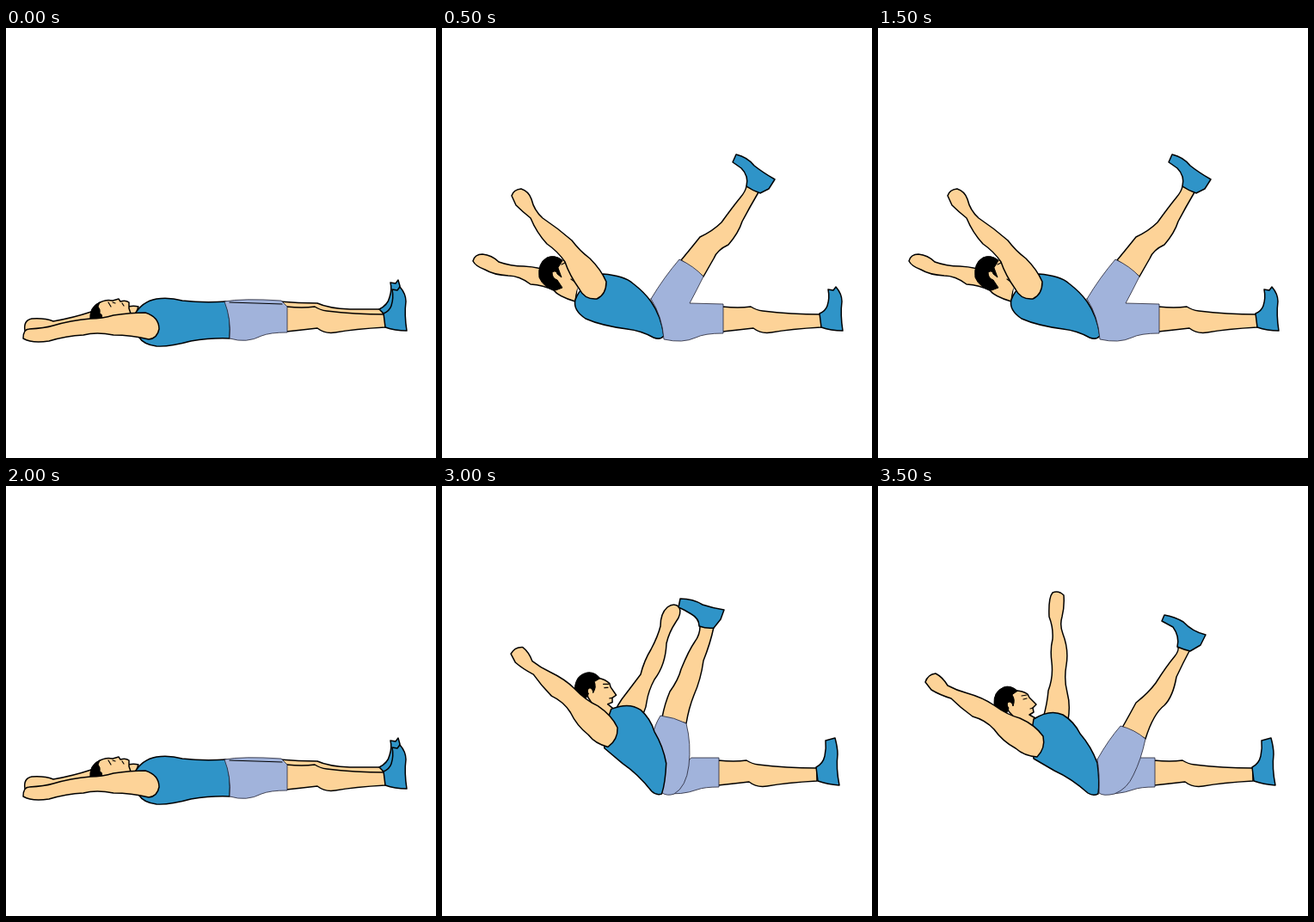
These frames come from a looping animation (500 px wide and 500 px high, 4 s). An HTML page without scripts:

```html
<!DOCTYPE html>
<html lang="en">
<head>
<meta charset="utf-8">
<title>Alternating toe touch</title>
<style>
  html, body { margin: 0; width: 100%; height: 100%; overflow: hidden; background: #fff; }
  svg { display: block; width: 100%; height: 100%; }
  path { stroke: #000; stroke-width: 1.5; stroke-linejoin: round; stroke-linecap: round; }
  .skin { fill: #fdd398; }
  .blue { fill: #2f94c8; }
  .shorts { fill: #a1b3db; stroke-width: .8; stroke: #223; }
  .hair { fill: #000; stroke-width: 1; }
  .line { fill: none; stroke-width: 1.2; }
  .bare { stroke: none; }

  .pose { visibility: hidden; animation: 4s step-end infinite; }
  .lying { animation-name: lying; }
  .openNear { animation-name: open-near; }
  .touchNear { animation-name: touch-near; }
  .openFar { animation-name: open-far; }
  .touchFar { animation-name: touch-far; }
  @keyframes lying { 0%, 50% { visibility: visible } 12.5%, 62.5%, 100% { visibility: hidden } }
  @keyframes open-near { 0%, 25%, 50%, 100% { visibility: hidden } 12.5%, 37.5% { visibility: visible } }
  @keyframes touch-near { 0%, 37.5%, 100% { visibility: hidden } 25% { visibility: visible } }
  @keyframes open-far { 0%, 75% { visibility: hidden } 62.5%, 87.5%, 100% { visibility: visible } }
  @keyframes touch-far { 0%, 87.5%, 100% { visibility: hidden } 75% { visibility: visible } }
</style>
</head>
<body>
<svg viewBox="0 0 500 500">
  <defs>
    <path id="shin" class="skin" d="M326 324Q345 326 359 324Q365 328 373 329Q405 333 441 333V348Q405 350 383 354Q371 356 362 349Q345 351 326 353Z"/>
    <g id="restLeg">
      <use href="#shin"/>
      <path class="blue" d="M439 332Q446 329 448 323Q451 314 449 304L455 305L458 301Q465 309 465 318Q463 333 466 352Q452 352 441 348Z"/>
    </g>
    <g id="restLegFar">
      <use href="#shin" x="-5" y="-5"/>
      <path class="blue" d="M435 327Q443 323 445 314Q447 305 446 296L457 293Q460 304 460 312Q458 328 462 348Q448 347 437 343Z"/>
      <path class="shorts" d="M290 316H322V350Q305 350 297 353Q278 360 258 357Z"/>
    </g>
    <g id="highLeg">
      <path class="skin" d="M259 266Q262 250 268 236Q278 222 281 210Q290 188 297 178Q303 170 303 160L319 161Q315 180 307 200Q304 222 296 240Q290 255 287 273Z"/>
      <path class="blue" d="M278 138L280 128Q295 128 306 135Q318 139 331 141L327 152L319 162Q311 163 302 160Q302 151 293 146Q285 141 278 138Z"/>
    </g>
    <path id="reachArm" class="skin" d="M201 270Q203 258 212 245Q225 228 234 216Q238 200 246 187Q254 172 257 160Q257 145 265 138Q273 132 279 138Q282 146 275 155Q267 167 264 180Q263 205 250 222Q243 235 241 248Q240 260 230 272Q215 284 204 278Q200 275 201 270Z"/>
    <g id="farTorso">
      <path class="skin" d="M152 262Q145 245 160 238Q168 238 174 242L176 246L184 254L180 258L181 263L176 266L185 271L188 286L165 276Z"/>
      <path class="hair" d="M162 238Q154 231 146 234Q134 239 135 254Q140 262 149 266L152 258Q148 254 152 251Q156 251 157 256Q160 248 156 243Z"/>
      <path class="line" d="M167 244L173 243M169 248L173 247M177 259L180 258"/>
      <path class="blue" d="M181 271Q200 259 215 266Q228 274 235 288Q248 303 255 322Q258 345 256 358Q250 361 244 357Q225 340 205 331L181 317L178 290Z"/>
      <path class="skin" d="M55 228Q58 219 67 218Q75 222 81 232Q92 238 104 241Q122 246 135 255Q150 266 165 270Q183 278 192 291Q195 305 185 315Q170 314 160 305Q145 297 135 283Q125 272 110 268Q96 258 85 247Q72 243 62 237Z"/>
    </g>
  </defs>

  <g class="pose lying">
    <path class="skin" d="M318 318Q340 320 362 320Q375 326 400 327L436 327L440 335L320 332Z"/>
    <path class="blue" d="M434 327Q444 322 446 313Q449 304 447 296L453 297L456 293L458 300L450 334L440 333Z"/>
    <use href="#restLeg"/>
    <path class="skin" d="M22 352Q20 340 30 338Q45 337 55 341Q78 337 99 330L112 342L50 355Z"/>
    <path class="skin" d="M138 325Q147 322 154 324L150 335H136Z"/>
    <path class="skin" d="M106 321Q115 315 124 317L131 315L133 318Q139 316 143 319L143 326L145 332L125 340H103Z"/>
    <path class="hair" d="M98 341Q96 324 109 319L107 324Q110 327 109 332Q113 333 111 338Z"/>
    <path class="line" d="M119 319L122 324M124 319L127 320M135 320L137 323"/>
    <path class="blue" d="M149 334Q158 318 175 315Q190 313 205 317Q230 320 256 318Q262 340 260 361Q240 360 215 364Q190 371 175 370Q160 368 155 360Z"/>
    <path class="skin" d="M20 361Q20 350 27 350Q45 349 55 346Q75 340 98 338Q112 338 125 334Q145 331 162 331Q178 336 178 350Q176 361 166 362Q145 357 125 357Q105 353 90 357Q70 358 50 364Q30 367 20 361Z"/>
    <path class="shorts" d="M254 318Q275 314 320 317L327 324V354Q307 354 297 358Q280 367 260 361Q262 338 254 318Z"/>
    <path class="line" d="M260 319L321 321"/>
  </g>

  <g class="pose openNear">
    <use href="#restLeg"/>
    <path class="skin" d="M36 271Q38 263 47 263Q58 264 66 272Q80 277 95 277Q115 278 130 285L157 303L155 318Q135 312 130 305Q118 299 103 298Q90 288 77 288Q60 287 50 281Q39 277 36 271Z"/>
    <path class="skin bare" d="M124 280L142 269L160 294L155 310L136 300Z"/>
    <path class="hair" d="M140 270Q131 263 122 267Q111 273 113 290Q118 302 132 305L140 302L134 293Q128 291 128 284Q133 281 134 286L139 290L135 279Z"/>
    <path class="line" d="M139 275L145 272M150 292L157 297"/>
    <path class="blue" d="M187 286Q212 288 222 297Q235 307 243 318Q255 335 258 358Q254 363 246 360Q232 352 215 350Q185 346 167 338Q152 328 155 316Q158 308 163 303Z"/>
    <path class="skin" d="M81 195Q83 188 92 187Q101 190 104 199Q107 212 117 221Q135 233 151 247Q160 259 172 268Q185 281 191 295Q191 310 180 315Q166 316 160 304Q148 287 143 272Q135 260 122 251Q110 238 103 221Q93 213 86 206Z"/>
    <path class="skin" d="M278 270Q288 258 300 243Q315 236 325 226Q338 208 347 197Q353 190 354 184L368 191Q358 208 349 225Q345 238 333 252Q320 258 316 268L304 289Z"/>
    <path class="blue" d="M338 156L342 147Q355 150 363 160Q373 168 387 176L380 187L370 192Q361 189 354 184Q357 172 348 163Z"/>
    <path class="shorts" d="M243 315Q258 290 276 269Q293 277 304 289Q296 305 288 320L327 321V355Q305 355 295 360Q280 367 258 362Q256 335 243 315Z"/>
  </g>

  <g class="pose touchNear">
    <use href="#restLeg"/>
    <use href="#highLeg"/>
    <path class="skin" d="M85 190Q86 183 96 183Q104 186 105 196Q110 206 118 209Q135 217 147 226L162 240L190 262L176 289Q168 270 155 255Q140 248 128 235Q117 218 100 210Q87 198 85 190Z"/>
    <path class="skin" d="M166 240Q174 222 184 223Q191 225 196 229L197 235L202 243L198 247L196 253L187 256L199 259L181 270Z"/>
    <path class="hair" d="M184 223Q175 215 165 218Q151 225 152 240Q155 252 165 257L173 258L171 250Q164 246 166 241Q171 238 172 244L176 248L174 236Q180 232 178 226Z"/>
    <path class="line" d="M187 231L194 229M188 235L193 234M193 248L198 247"/>
    <path class="shorts" d="M247 290Q250 275 257 264Q273 266 287 273Q288 290 283 308L281 320L327 321V355Q305 355 295 360Q280 367 257 362L250 340Z"/>
    <path class="blue" d="M177 288Q177 270 190 261Q198 255 206 257L233 267Q246 282 250 300Q255 320 255 357Q250 360 243 356Q230 343 212 330Q190 315 184 305Q176 295 177 288Z"/>
    <use href="#reachArm"/>
  </g>

  <g class="pose openFar">
    <path class="skin" d="M192 270Q197 252 198 238Q204 222 202 205Q200 190 203 178Q204 165 199 152Q198 130 203 124Q210 121 216 127Q217 140 214 152Q211 162 215 172Q222 190 219 208Q216 225 220 240Q224 255 221 272Z"/>
    <use href="#restLegFar"/>
    <use href="#farTorso"/>
    <path class="skin" d="M284 281Q293 265 300 252Q315 240 323 229Q335 210 345 198Q350 192 349 187L363 190Q355 205 347 222Q343 245 333 255Q320 265 311 294Z"/>
    <path class="blue" d="M330 157L333 150Q345 152 355 158Q365 169 381 173L375 185L363 192Q355 190 348 187Q351 175 343 164Z"/>
    <path class="shorts" d="M255 318Q268 295 282 279Q298 283 311 294Q306 318 297 336Q290 352 275 358Q262 361 257 357Q258 335 255 318Z"/>
  </g>

  <g class="pose touchFar">
    <use href="#reachArm" x="-3" y="3"/>
    <use href="#restLegFar"/>
    <use href="#highLeg" x="-3" y="3"/>
    <path class="shorts" d="M244 293Q247 278 254 267Q270 269 284 276Q290 300 287 325Q284 350 270 358Q262 361 256 357Z"/>
    <use href="#farTorso" transform="rotate(10 255 355)"/>
  </g>
</svg>
</body>
</html>
```
